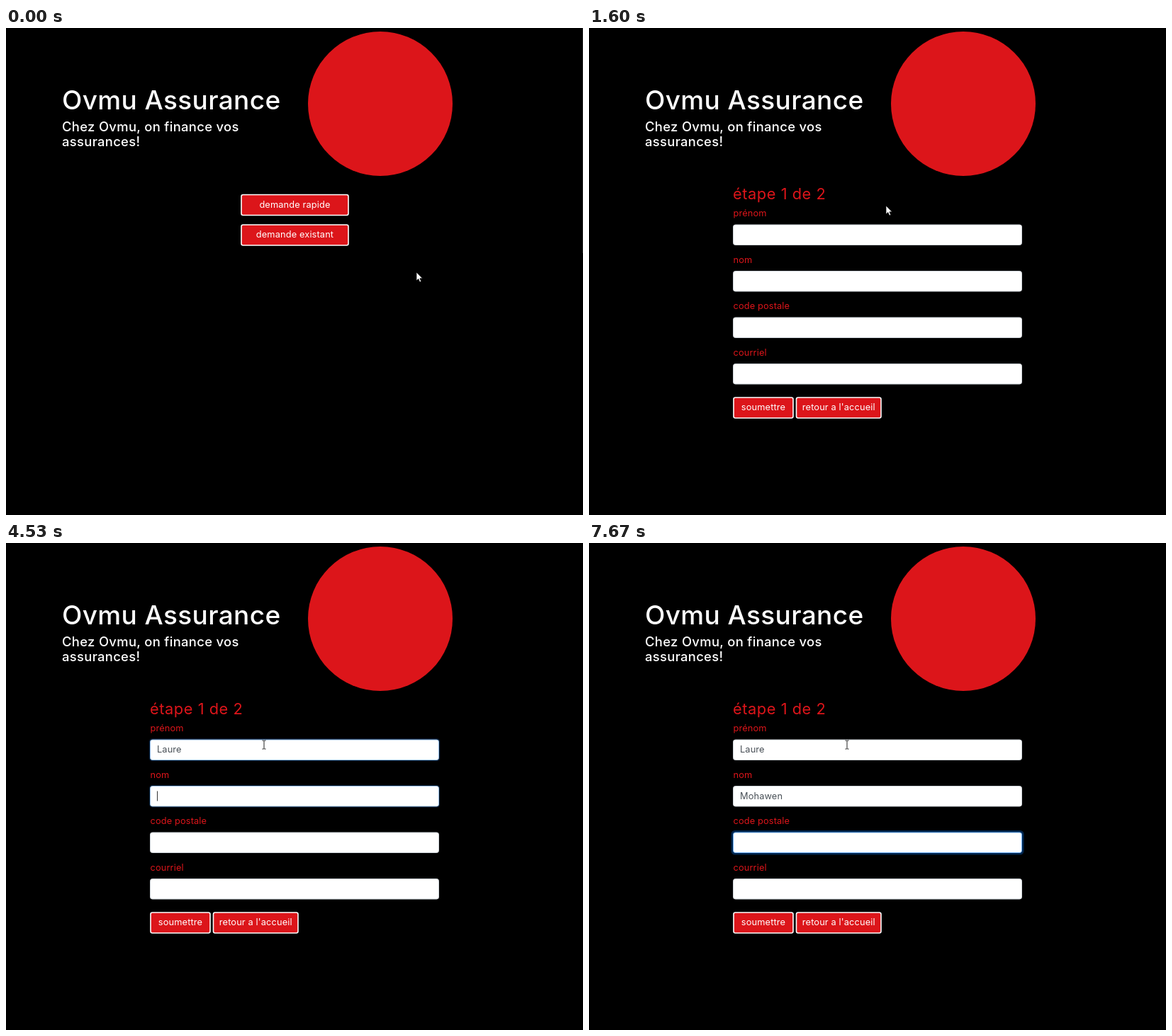
Animation of 814x688 px, one loop 8000 ms. Source, as an HTML page:

```html
<!DOCTYPE html>
<html lang="fr">
<head>
<meta charset="utf-8">
<title>Demande</title>
<style>
  html, body { margin: 0; width: 100%; height: 100%; overflow: hidden; background: #000; }
  svg { display: block; width: 814px; height: 688px; }
  text { font: 12.8px Inter, sans-serif; letter-spacing: .01em; white-space: pre; }
  .red { fill: #dc151a; }
  .white { fill: #fff; }
  .mid { text-anchor: middle; }
  .value { fill: #495057; }
  #popup text { font-family: "Open Sans", sans-serif; letter-spacing: 0; }
</style>
</head>
<body>
<svg viewBox="0 0 814 688">
  <circle class="red" cx="528" cy="107" r="102"/>
  <g class="white">
    <text x="79" y="115" style="font-size:37px;font-weight:500">Ovmu Assurance</text>
    <g style="font-weight:500">
      <text x="79" y="146" style="font-size:18.4px;font-weight:500;letter-spacing:.018em">Chez Ovmu, on finance vos</text>
      <text x="79" y="167" style="font-size:18.4px;font-weight:500;letter-spacing:.018em">assurances!</text>
    </g>
  </g>
  <g id="home">
    <path d="M813.5 0V318" stroke="#222"/>
    <rect id="press" fill="none" stroke="#268fff" stroke-opacity=".5" x="330.5" y="234" width="154" height="32" rx="4"/>
  </g>
  <g id="form">
    <text class="red" x="203" y="242" style="font-size:21.8px;letter-spacing:.025em">étape 1 de 2</text>
  </g>
  <g id="popup">
    <rect x="203" y="309" width="148" height="88" rx="3" fill="#000" opacity=".2"/>
    <rect x="203.5" y="307.5" width="146" height="87.5" rx="2" fill="#fff"/>
    <path d="M204 364.5H349" stroke="#ddd"/>
    <text x="212" y="331" fill="#222" style="font-size:9.8px">VKD</text>
    <text x="212" y="347" fill="#555" style="font-size:8.6px">Z4W8Q2</text>
    <text x="212" y="384" fill="#333" style="font-size:10px">Manage addresses...</text>
  </g>
  <path id="caret" stroke="#333"/>
  <path id="arrow" fill="#fff" stroke="#000" stroke-width=".7" d="M0 0V12L2.8 9.5 4.8 14 6.8 13.1 4.9 8.8H8.6Z"/>
  <path id="hand" fill="#fff" stroke="#000" stroke-width=".8" d="M-1.4 1Q0 -.6 1.4 1V6L7 7.2Q8.6 7.8 8.5 9.5L7.5 14V17.5H-1.2V15L-4.6 10.5Q-5 8.6 -3.2 9L-1.4 10.8Z"/>
  <path id="beam" fill="none" stroke="#222" d="M-2.5 -6H-.5L0 -5.5 .5 -6H2.5M0 -5.5V5.5M-2.5 6H-.5L0 5.5 .5 6H2.5"/>
</svg>
<script>
const LOOP = 8000, PAGE = 1600;
const $ = id => document.getElementById(id);

function add(parent, tag, attrs, text = "") {
  const el = document.createElementNS("http://www.w3.org/2000/svg", tag);
  for (const k in attrs) el.setAttribute(k, attrs[k]);
  el.textContent = text;
  return parent.appendChild(el);
}

function button(parent, x, y, width, label) {
  add(parent, "rect", { class: "red", x, y, width, height: 29, rx: 2.5, stroke: "#fff", "stroke-width": 1.6 });
  add(parent, "text", { class: "white mid", x: x + width / 2, y: y + 18 }, label);
}
button($("home"), 332, 235.5, 151, "demande rapide");
button($("home"), 332, 278, 151, "demande existant");
button($("form"), 204, 522, 84, "soumettre");
button($("form"), 292.5, 522, 119.5, "retour a l'accueil");

const fields = ["prénom", "nom", "code postale", "courriel"].map((label, i) => {
  const y = 278 + i * 65.5, form = $("form");
  add(form, "text", { class: "red", x: 203.5, y: y - 12 }, label);
  return {
    y,
    ring: add(form, "rect", { fill: "#007bff" }),
    box: add(form, "rect", { fill: "#fff", x: 203.5, y, width: 407, height: 28.5, rx: 3 }),
    value: add(form, "text", { class: "value", x: 213, y: y + 18 })
  };
});

// focus and blur times, then the typed text as [time, letters shown]
const focus = [[2390, 4460], [4460, 7110], [7110, 1e5], [1e5, 1e5]];
const typed = [
  ["Laure", [[3670, 1], [3870, 3], [4070, 4], [4200, 5]]],
  ["Mohawen", [[5930, 1], [6130, 2], [6470, 3], [6670, 4], [6730, 5], [6870, 6], [6930, 7]]]
];
const caretOff = [[2930, 3470], [5070, 5530], [7670, LOOP]];
// pointer stops: time, x, y
const stops = [[0, 579, 345], [870, 424, 252], [930, 419, 250.5], [1870, 419, 251], [2330, 362, 288], [2600, 362, 288], [2930, 364, 285]];

const clamp = v => Math.max(0, Math.min(1, v));
const smooth = v => (v = clamp(v)) * v * (3 - 2 * v);
const within = (t, [a, b]) => t >= a && t < b;
const show = (id, on) => $(id).style.display = on ? "" : "none";
const mix = (a, b, p) => `rgb(${a.map((v, i) => v + (b[i] - v) * p)})`;

function pointer(t) {
  let i = 0;
  while (i < stops.length - 2 && t >= stops[i + 1][0]) i++;
  const [t0, x0, y0] = stops[i], [t1, x1, y1] = stops[i + 1];
  const p = smooth((t - t0) / (t1 - t0));
  return [x0 + (x1 - x0) * p, y0 + (y1 - y0) * p];
}

function draw(t) {
  const onForm = t >= PAGE;
  show("home", !onForm);
  show("form", onForm);
  show("popup", within(t, [2530, 3670]));
  $("press").setAttribute("stroke-width", 2 * smooth((t - 1400) / 150));

  fields.forEach((f, i) => {
    const [on, off] = focus[i];
    const p = smooth((t - on) / 150) - smooth((t - off) / 150);
    const s = 2.6 * p;
    const ring = { x: 203 - s, y: f.y - .5 - s, width: 408 + 2 * s, height: 29.5 + 2 * s, rx: 3 + s, opacity: .3 * p };
    for (const k in ring) f.ring.setAttribute(k, ring[k]);
    f.box.setAttribute("stroke", mix([206, 212, 218], [110, 175, 245], p));
    if (typed[i]) {
      const [word, keys] = typed[i];
      const n = keys.reduce((n, [at, count]) => t >= at ? count : n, 0);
      f.value.textContent = word.slice(0, n);
    }
  });

  const active = focus.findIndex(span => within(t, span));
  const caret = active >= 0 && !caretOff.some(span => within(t, span));
  show("caret", caret);
  if (caret) {
    const f = fields[active];
    const w = f.value.textContent ? f.value.getComputedTextLength() : 0;
    $("caret").setAttribute("d", `M${213.5 + Math.round(w)} ${f.y + 7}v14`);
  }

  const [x, y] = pointer(t);
  const overButton = x > 331 && x < 484 && (within(y, [235, 265]) || within(y, [277, 307]));
  const kind = onForm ? (y >= 278 ? "beam" : "arrow") : overButton && t < 1530 ? "hand" : "arrow";
  for (const id of ["arrow", "hand", "beam"]) show(id, id === kind);
  $(kind).setAttribute("transform", `translate(${Math.round(x)} ${Math.round(y)})`);
}

const start = performance.now();
function tick() {
  draw((performance.now() - start) % LOOP);
  requestAnimationFrame(tick);
}
tick();
</script>
</body>
</html>
```
